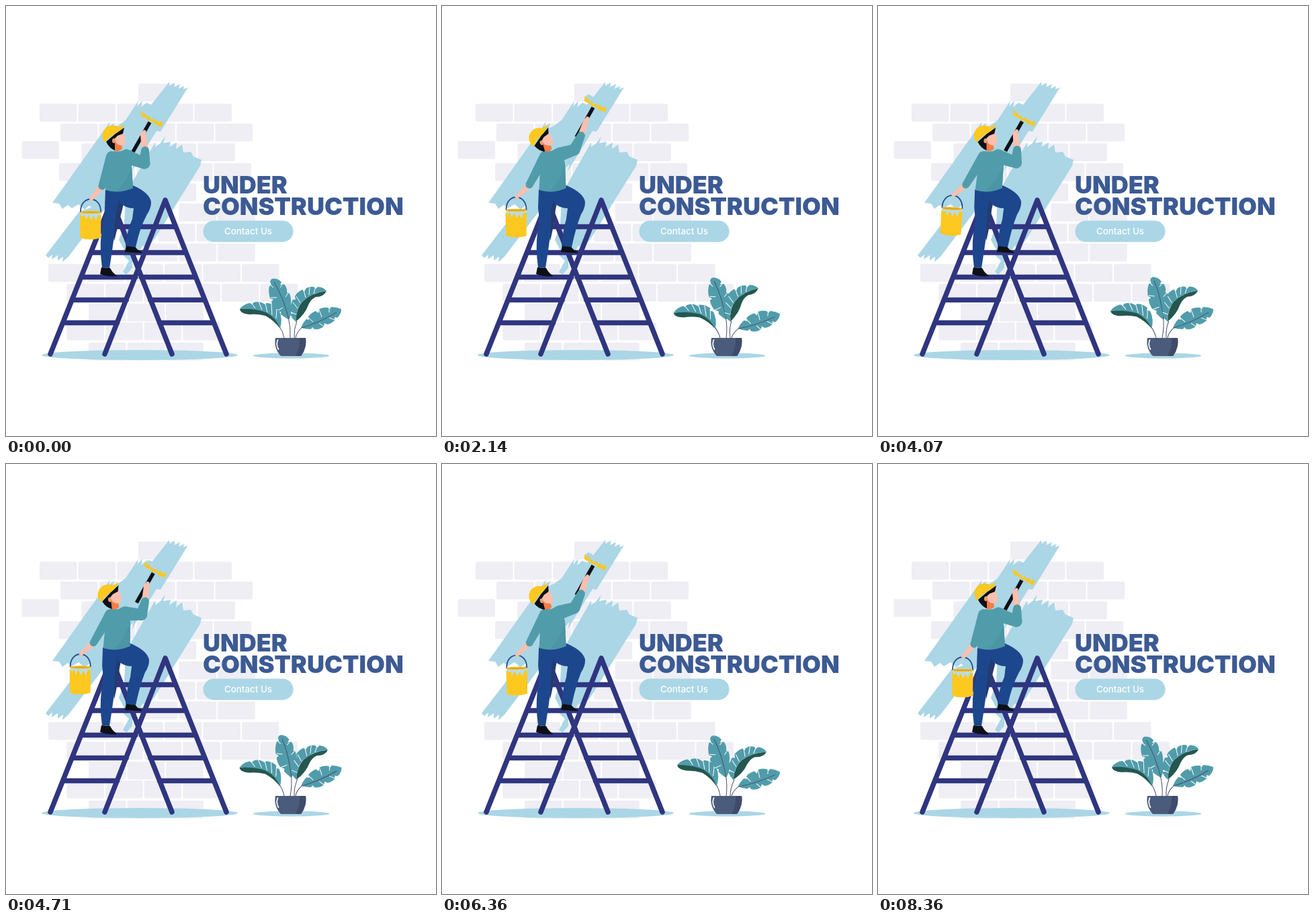
These frames come from a looping animation (640x640 px, 8.43 s). An HTML page:

```html
<!DOCTYPE html>
<html lang="en">
<head>
<meta charset="utf-8">
<title>Under construction</title>
<style>
  html, body { margin: 0; width: 100%; height: 100%; overflow: hidden; background: #fff; }
  svg { display: block; width: 100%; height: 100%; }
  text { font-family: Montserrat, Inter, sans-serif; }
  .title { font-size: 36px; font-weight: 900; fill: #3c5a94; }
  .label { font-size: 13.4px; font-weight: 500; fill: #fff; text-anchor: middle; }
  .teal { fill: #519cab; }
  .dark { fill: #24574f; }
  .stem { fill: none; stroke: #4b4e6d; stroke-width: 1; }
  .cut { fill: none; stroke: #fff; stroke-width: 1; }
</style>
</head>
<body>
<svg viewBox="0 0 640 640">
  <g id="bricks" fill="#eeeef4"></g>
  <g fill="#abd6e6">
    <path d="M243 113L243 119L251 114L250 121L259 116L257 123L265 119L264 124L271 121L230 187L224 186L187 246L190 235L183 242L143 303L136 299L131 305L124 297L117 303L108 295L98 301L92 296L84 302L79 294L69 293L155 172L153 180L161 174L159 182L167 178L178 170L197 141L195 150L203 141L201 151L209 144L216 147Z"/>
    <path d="M237 194L234 204L245 202L243 210L254 203L253 213L262 206L264 218L275 217L279 224L291 229L289 238L221 347L211 358L203 357L188 381L188 390L179 400L174 396L183 379L175 372L176 363L168 348L176 325L178 280L222 203L222 210L230 204Z"/>
    <path d="M109 306L59 371L63 375L69 370L68 377L77 371L77 379L85 373L84 381L93 373L150 298L132 298Z"/>
    <ellipse cx="199" cy="519.5" rx="146" ry="7.5"/>
    <ellipse cx="424.5" cy="520.5" rx="57" ry="4"/>
    <rect x="293.5" y="319.5" width="134" height="31.7" rx="15.8"/>
  </g>
  <text class="title" x="293" y="279">UNDER</text>
  <text class="title" x="293" y="310.5">CONSTRUCTION</text>
  <text class="label" x="360.5" y="340">Contact Us</text>

  <g id="leafBack">
    <path class="stem" d="M423 494Q424 478 420 463"/>
    <path class="teal" d="M396 406Q405 405 410 411L408 415L414 414Q419 420 418 426L422 428Q425 436 424 444L426 448Q425 459 421 467Q414 463 409 459L409 455L403 454Q396 447 395 440L398 437L393 435Q390 425 392 417L395 415Q391 409 396 406Z"/>
    <path class="stem" d="M399 411Q412 432 421 466"/>
    <path class="cut" d="M411 415L408 419M420 427L416 433M393 415L398 419M394 434L403 434M403 454L412 449"/>
  </g>
  <g id="leafLeft">
    <path class="stem" d="M414 494Q412 484 407 477"/>
    <path class="dark" d="M348 451Q376 448 394 458Q407 466 408 480Q399 468 386 461Q374 458 363 459Q349 458 348 451Z"/>
    <path class="teal" d="M348 451Q353 444 363 442L366 444L369 441Q377 439 382 442L385 444L388 442Q398 443 403 449L402 452L407 454Q412 466 408 480Q402 464 387 456Q370 450 348 451Z"/>
    <path class="cut" d="M366 443L371 450M376 440L381 452M386 443L389 456M395 444L396 460M403 451L402 465"/>
  </g>
  <g id="leafTop">
    <path class="stem" d="M429 494Q428 482 433 469"/>
    <path class="dark" d="M477 424Q473 433 461 433Q454 436 450 445Q445 459 431 470Q432 450 441 440Q454 427 477 424Z"/>
    <path class="teal" d="M477 424Q472 418 464 418L461 421L458 418Q451 417 446 421L444 425L441 422Q433 426 430 432L431 437L427 437Q422 446 424 454L427 457L423 459Q427 467 432 470Q431 451 440 441Q453 427 477 424Z"/>
    <path class="cut" d="M461 418L458 428M452 418L451 430M443 423L446 434M432 432L438 442M427 441L434 450M424 456L432 459"/>
  </g>
  <g id="leafRight">
    <path class="stem" d="M431 494Q432 486 441 478"/>
    <path class="teal" d="M499 451Q499 459 493 464L489 463L489 468Q484 473 478 474L474 472L473 477Q467 482 459 481L456 478L454 481Q446 481 439 479Q442 471 447 466L451 467L450 462Q455 456 461 454L465 457L466 451Q473 448 479 449L482 451L484 448Q492 448 499 451Z"/>
    <path class="stem" d="M440 479Q465 472 492 456"/>
    <path class="cut" d="M450 464L457 470M466 452L470 463M481 449L481 456M489 467L481 464M473 477L466 472"/>
  </g>
  <path d="M401 494H446Q448 509 439 521H409Q398 509 401 494Z" fill="#4a5b7c"/>
  <path d="M437 494H446Q448 509 439 521H431Q438 508 437 494Z" fill="#404b6c"/>
  <path d="M404.500 497Q401.500 504 405.500 511" fill="none" stroke="#fff" stroke-width="1.700" stroke-linecap="round"/>

  <g id="ladder" fill="none" stroke="#2f357f" stroke-width="7.500" stroke-linecap="round" stroke-linejoin="round"></g>
  <g id="worker"></g>
</svg>
<script>
const LOOP = 8430, STEPS = 117;
const SKIN = '#fbbfae', TEAL = '#519cab', YELLOW = '#fdc81f', BLACK = '#0d1016', BLUE = '#1d478c';
const $ = id => document.getElementById(id);

// Wall rows: top, left, count
const rows = [
  [115.5, 197, 1], [145.5, 50, 5], [175, 81, 5], [201, 23.500, 1], [204.5, 112.500, 4],
  [234, 79, 5], [264, 227.5, 1], [294, 257.500, 2], [324, 226, 2], [353.5, 200, 3],
  [384, 63, 6], [413.5, 90.5, 6], [443, 123, 3], [471, 90.5, 4], [501, 123, 3]
];
$('bricks').innerHTML = rows.map(([y, x, n]) => Array.from({length: n}, (_, i) =>
  `<rect x="${x + i * 57.6}" y="${y}" width="55.600" height="26.500" rx="2.500"/>`).join('')).join('');

const legX = y => 66 + (518 - y) * 0.4;
const rungs = [328.5, 367, 403.5, 437.5, 471.5].map(y => {
  const x = legX(y), mirror = 394 - x;
  return `M${x} ${y}H${x + 81}M${mirror - 81} ${y}H${mirror}`;
}).join('');
$('ladder').innerHTML = `<path d="M66 518L157 290L247 518M147 518L237 289L328 518${rungs}"/>`;

// Smooth periodic curve through [time, value] keys
function track(keys) {
  const n = keys.length;
  const key = i => {
    const wrap = Math.floor(i / n), [t, v] = keys[i - wrap * n];
    return [t + wrap * LOOP, v];
  };
  const slope = i => {
    const [a, b, c] = [key(i - 1), key(i), key(i + 1)];
    const s = (b[1] - a[1]) / (b[0] - a[0]), e = (c[1] - b[1]) / (c[0] - b[0]);
    return s * e <= 0 ? 0 : 2 * s * e / (s + e);
  };
  return t => {
    let i = 0;
    while (i < n - 1 && keys[i + 1][0] <= t) i++;
    const [t0, v0] = key(i), [t1, v1] = key(i + 1);
    const d = t1 - t0, u = (t - t0) / d, w = 1 - u;
    return v0 * w * w * (1 + 2 * u) + v1 * u * u * (3 - 2 * u)
      + d * u * w * (w * slope(i) - u * slope(i + 1));
  };
}

const reachAt = track([[0, 0], [430, 0.42], [860, 0.88], [1300, 1], [2200, 1], [2600, 0.88], [3430, 0.36],
  [4070, 0.04], [4250, 0.02], [4700, 0.5], [5140, 0.95], [5430, 1], [6300, 1], [6930, 0.74],
  [7210, 0.55], [7710, 0.2], [8360, 0]]);
const leanAt = track([[0, 0], [430, 0.5], [860, 1], [2140, 1], [2640, 0.8], [3150, 0.6], [3500, 0.65],
  [4070, 0.95], [5430, 1], [6300, 0.98], [6930, 0.6], [7210, 0.38], [7710, 0.1], [8360, 0]]);
const swingAt = track([[0, 0], [430, 5], [860, 12], [1290, 5], [1710, -3], [2140, 0], [2640, -3], [3300, -3],
  [4070, 3], [4700, 0], [5430, -3], [6200, -1], [7210, -5], [7800, -1], [8360, 0]]);

const mix = (a, b, k) => a.map((v, i) => v + (b[i] - v) * k);
const shape = (d, fill) => `<path d="${d}" fill="${fill}"/>`;

// Tapered round-ended limb
function limb([ax, ay], ra, [bx, by], rb, fill) {
  const len = Math.hypot(bx - ax, by - ay) || 1;
  const nx = (ay - by) / len, ny = (bx - ax) / len;
  return shape(`M${ax + nx * ra} ${ay + ny * ra}L${bx + nx * rb} ${by + ny * rb}`
    + `A${rb} ${rb} 0 0 0 ${bx - nx * rb} ${by - ny * rb}`
    + `L${ax - nx * ra} ${ay - ny * ra}A${ra} ${ra} 0 0 0 ${ax + nx * ra} ${ay + ny * ra}Z`, fill);
}

function legs(lean) {
  const h = -4 * lean, k = -3 * lean;
  return shape('M142 389L155 390Q159 398 165 401L164 402.500Q151 403 140 399Z', BLACK)
    + shape('M179 356L192 358Q196 364 202 366V367.500Q189 367 177 366Z', BLACK)
    + shape(`M${160 + h} 274L${178 + h} 280L${173 + h} 303Q167 325 161 350L158 330Z`, '#243b70')
    + shape(`M${148 + h} 273L${174 + h} 275L${165 + h / 2} 300Q162 318 161 342Q158 366 154 390L143 389`
      + `Q139 360 142 338Q146 322 ${147 + h} 300Z`, BLUE)
    + shape(`M${160 + h} 275L${189 + h} 267Q${214 + k} 278 ${216 + k} 292Q${216 + k} 301 ${210 + k} 310`
      + `Q199 330 193 359L178 357Q180 334 ${188 + k} 317L${190 + k} 301Q${180 + k} 301 ${172 + k} 295Z`, BLUE);
}

function bucket([x, y], angle) {
  return `<g transform="translate(${x} ${y}) rotate(${angle})">`
    + '<path d="M-15 19C-16 -7 16 -7 15 19" fill="none" stroke="#27508c" stroke-width="1.800"/>'
    + shape('M-15 19H15L15.500 30H-15.500Z', '#b7dce9')
    + shape('M-16 22L-12 25L-9 23L-7 30L-3 23L1 31L4 24L8 31L11 23L15.500 23L15 57Q0 62 -15.500 57Z', YELLOW)
    + '<ellipse cy="19" rx="15" ry="1.800" fill="#dda52c" stroke="#fdc81f" stroke-width="1"/></g>';
}

function head(r) {
  return `<g transform="translate(${-9.5 * r} ${r}) rotate(${-15 * r} 167 212)">`
    + shape('M160 200L172 205L173 213Q167 218 161 215Z', '#f77d45')
    + shape('M162 190L175 187Q177 195 178 200L177 206Q171 210 164 204Z', SKIN)
    + shape('M149 202L163 190L176 181L174 190L166 193L161 198L162 206L162 215Q153 211 149 202Z', BLACK)
    + '<ellipse cx="160.500" cy="200.500" rx="2.500" ry="3.500" fill="#f99a73"/>'
    + shape('M147 203Q141 195 145 186Q151 176 162 178L168 180L176 176.500Q175 182 166 188Q155 193 147 203Z', YELLOW)
    + '</g>';
}

function roller(r) {
  return `<g transform="translate(${11 * r} ${-22 * r})">`
    + '<path d="M189 217L214 173" stroke="#0d1016" stroke-width="5.500"/>'
    + '<g transform="translate(217 168) rotate(28)">'
    + shape('M-17 -7Q-12 -10 -7 -7L16 -5V1H-17Z', '#abd6e6')
    + shape('M-19 -3L-17 -4L-15 0L-12 -3L-9 1L-6 -2L-2 2L1 -2L5 1L8 -3L11 1L14 -3L18 -2L18 5L13 4L9 5L3 3L-2 5L-7 3L-13 4L-17 3Z', YELLOW)
    + '</g></g>';
}

function torso(r, lean) {
  const left = 148 - 3.500 * lean, right = 189 - 4.500 * lean;
  const side = `${187 - 4 * r} ${238 - 4 * r}`;
  return shape(`M${161 - 8 * r} 216Q${154 - 5 * r} 218 ${151 - 4 * r} 228L${left} 274`
      + `Q${left + 21} 280 ${right} 271L${side}L${186 - 8 * r} ${215 - r}L${179 - 11 * r} 213`
      + `Q${170 - 9 * r} 218 ${161 - 8 * r} 216Z`, TEAL)
    + shape(`M${side}L${right} 271Q${right - 10} 275 ${right - 24} 275Q${right - 9} 262 ${side}Z`, '#4b95a4');
}

function worker(t) {
  const r = reachAt(t), lean = leanAt(t);
  const shoulder = [179 - 4 * r, 224 - 3 * r];
  const elbow = mix([206, 234], [197, 214], r);
  const wrist = mix([207, 215], [207, 193], r);
  const hand = mix([204, 191], [214.500, 171], r);
  const backShoulder = [157 - 4 * r, 224];
  const backWrist = mix([143, 268], [130, 266], lean);
  const grip = [126 - 15.500 * lean - Math.max(0, swingAt(t) - 3) * 0.35, 288 - 3 * lean - 3 * lean * (1 - r)];
  return legs(lean)
    + bucket(grip, swingAt(t))
    + limb(backWrist, 4.500, [grip[0] + 1, grip[1] - 1], 2.800, SKIN)
    + roller(r)
    + limb(wrist, 5, hand, 4, SKIN)
    + limb(hand, 3.500, [hand[0] + 2, hand[1] - 4], 2.500, SKIN)
    + limb(elbow, 8.500, wrist, 6, TEAL)
    + limb(shoulder, 10.500, elbow, 8.500, TEAL)
    + limb(backShoulder, 8, backWrist, 5.500, TEAL)
    + head(r)
    + torso(r, lean);
}

const turn = (id, angle, x, y) => $(id).setAttribute('transform', `rotate(${angle} ${x} ${y})`);

function draw(t) {
  const a = 2 * Math.PI * t / LOOP;
  turn('leafLeft', -4 * (Math.sin(a - 0.25) + Math.sin(0.25)), 414, 494);
  turn('leafBack', 4.1 * (1 - Math.cos(a)), 422, 494);
  turn('leafTop', -5 * Math.sin(a), 429, 494);
  turn('leafRight', 3 * (1 - Math.cos(2 * a)), 431, 494);
  $('worker').innerHTML = worker(t);
}

let shown = -1;
function frame() {
  const step = Math.floor(performance.now() % LOOP / LOOP * STEPS);
  if (step !== shown) draw((shown = step) * LOOP / STEPS);
  requestAnimationFrame(frame);
}
frame();
</script>
</body>
</html>
```
